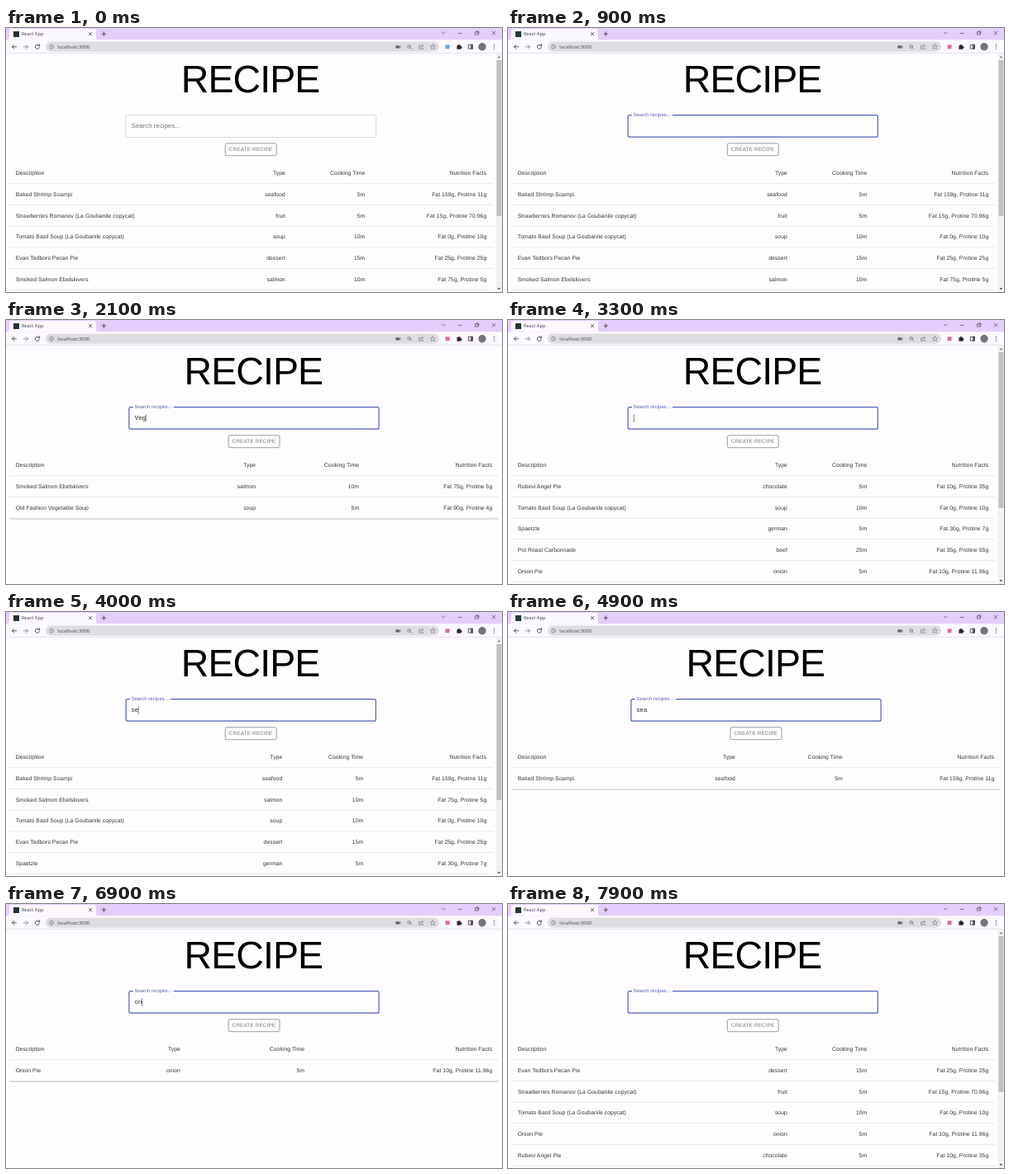
An HTML page for the animation above (8 s loop, 600 px wide and 320 px high).

```html
<!DOCTYPE html>
<html lang="en">
<head>
<meta charset="utf-8">
<title>Recipe search</title>
<style>
html, body { margin: 0; width: 100%; height: 100%; overflow: hidden; background: #fefcff; }
svg { display: block; width: 600px; height: 320px; }
text { font-family: "Liberation Sans", Arial, sans-serif; text-rendering: geometricPrecision; white-space: pre; }
.ui { font-family: "Open Sans", sans-serif; fill: #45414a; }
.cell { font-size: 6.78px; letter-spacing: .0107em; fill: #333; }
.field { font-size: 7.75px; letter-spacing: .0094em; }
.icon { fill: none; stroke: #4a474e; stroke-width: .9; stroke-linecap: round; stroke-linejoin: round; }
.thin { stroke-width: .65; }
.soft { stroke: #737077; }
.solid { fill: #5d5a61; }
</style>
</head>
<body>
<svg viewBox="0 0 600 320">
  <defs>
    <filter id="shadow" x="-5%" y="-10%" width="110%" height="125%">
      <feDropShadow dx="0" dy=".7" stdDeviation=".7" flood-opacity=".34"/>
    </filter>
    <clipPath id="view"><rect y="31" width="600" height="289"/></clipPath>
  </defs>
  <rect width="600" height="320" fill="#fefcff"/>

  <g clip-path="url(#view)">
    <g id="center">
      <text x="-84.4" y="77.9" font-size="46.5" letter-spacing="-.92">RECIPE</text>
      <path id="outline" fill="none"/>
      <text id="label" class="field">Search recipes...</text>
      <text id="query" class="field" x="-144.4" y="121.4" fill="#333"></text>
      <rect id="caret" y="114.5" width=".6" height="9" fill="#222"/>
      <rect x="-31" y="139.8" width="62" height="14.9" rx="2" fill="none" stroke="#858585" stroke-width=".8"/>
      <text x="-26.4" y="149.3" font-size="6.3" letter-spacing=".18" fill="#777">CREATE RECIPE</text>
    </g>
    <rect id="paper" x="4" y="163.3" rx="2" fill="#fefcff" filter="url(#shadow)"/>
    <g id="table"></g>
  </g>

  <g id="scrollbar">
    <rect x="592.5" y="31" width="7.5" height="289" fill="#f2f0f3"/>
    <rect x="593.5" y="39" width="5.8" height="189" fill="#c1bfc3"/>
    <path d="M594.5 36.2l1.9-2.2 1.9 2.2z" fill="#777"/>
    <path d="M594.5 315l1.9 2.2 1.9-2.2z" fill="#555"/>
  </g>

  <rect width="600" height="14.5" fill="#e4cefb"/>
  <path d="M1 14.5q3 0 3-3V4q0-3 3-3h99q3 0 3 3v7.5q0 3 3 3z" fill="#fcf8ff"/>
  <rect x="9" y="4" width="7" height="7" fill="#24333c"/>
  <text class="ui" x="18.8" y="9" font-size="5.7">React App</text>
  <g class="icon">
    <path d="M100.4 5.6l3.200 3.200m0-3.200l-3.200 3.200M115.800 7.100h5m-2.500-2.500v5"/>
    <path class="thin" d="M527.300 5.100l2 2 2-2M547.300 6.400h4.200M567.800 4.900h3.200v3.200h-3.200zM568.800 4.900v-1h3.200v3.200h-1M588 4.200l4 4m0-4l-4 4"/>
  </g>

  <rect y="14.5" width="600" height="16" fill="#fcf8ff"/>
  <rect y="30.3" width="600" height=".6" fill="#d8d5db"/>
  <rect x="48" y="16.6" width="476" height="12.2" rx="6.1" fill="#dfdde1"/>
  <text class="ui" x="62.3" y="24.6" font-size="5.75">localhost:3000</text>
  <g class="icon">
    <path d="M12.6 22.8h-5.2m2.4-2.4l-2.4 2.4 2.4 2.4"/>
    <path d="M21.4 22.8h5.2m-2.4-2.4l2.4 2.4-2.4 2.4" stroke="#8b8890"/>
    <path d="M40.3 21.5a2.6 2.6 0 1 0 .2 2M40.6 19.8v1.9h-1.9"/>
    <g class="thin soft">
      <circle cx="55" cy="22.8" r="2.5"/>
      <path d="M55 22.6v1.5M55 21.3v.1"/>
      <path class="solid" d="M472 21.4h3.200v2.900h-3.200zM475.4 22.8l1.500-1.200v2.500z"/>
      <circle cx="487.7" cy="22.4" r="2"/>
      <path d="M489.2 23.9l1.800 1.800M486.8 22.400h1.800"/>
      <path d="M501 21.3h-1.400v4h5v-1.200M501.3 23.600q.2-2.300 3-2.300m-1.200-1.300l1.400 1.300-1.400 1.300"/>
      <path d="M516.5 19.700l.9 2 2.100.2-1.600 1.500.5 2.100-1.900-1.100-1.900 1.100.5-2.100-1.600-1.500 2.100-.2z"/>
    </g>
    <path d="M545.8 21.3h1.400q-.2-1.300.8-1.300t.8 1.300h1.400v1.400q1.300-.2 1.300.8t-1.300.8v1.300h-4.400z" style="fill:#28252c;stroke:#28252c;stroke-width:.4"/>
    <path d="M559.7 20.300h4.800v4.800h-4.800z"/>
    <path class="solid" d="M562.8 20.300h1.700v4.800h-1.700z"/>
  </g>
  <rect id="extension" x="531.6" y="20.3" width="5" height="5"/>
  <circle cx="576" cy="22.8" r="4.7" fill="#77737b"/>
  <g fill="#4a474e"><circle cx="590.5" cy="20.5" r=".65"/><circle cx="590.5" cy="22.8" r=".65"/><circle cx="590.5" cy="25.1" r=".65"/></g>
</svg>
<script>
const LOOP = 8000, FOCUS = 300, PAD = 7.75, TOP = 163.3, ROW = 25.7;
const HEAD = ["Description", "Type", "Cooking Time", "Nutrition Facts"];
const RECIPES = [
  ["Baked Shrimp Scampi", "seafood", 5, 159, 11],
  ["Strawberries Romanov (La Goubanile copycat)", "fruit", 5, 15, 70.96],
  ["Tomato Basil Soup (La Goubanile copycat)", "soup", 10, 0, 10],
  ["Evan Tedbors Pecan Pie", "dessert", 15, 25, 25],
  ["Smoked Salmon Ebelskivers", "salmon", 10, 75, 5],
  ["Rubevi Angel Pie", "chocolate", 5, 10, 35],
  ["Spaetzle", "german", 5, 30, 7],
  ["Pot Roast Carbonnade", "beef", 25, 35, 55],
  ["Onion Pie", "onion", 5, 10, 11.96],
  ["Old Fashion Vegetable Soup", "soup", 5, 90, 4]
].map(([name, type, mins, fat, protein]) =>
  [name, type, mins + "m", `Fat ${fat}g, Protine ${protein}g`]);

// [time, text in the field]
const TYPING = [
  [FOCUS, ""], [1500, "V"], [1800, "Ve"], [2000, "Veg"],
  [2500, "Ve"], [2650, "V"], [2850, ""],
  [3600, "s"], [3950, "se"], [4200, "sea"],
  [5250, "se"], [5400, "s"], [5550, ""],
  [5950, "o"], [6100, "on"], [6250, "oni"],
  [6880, "on"], [6980, "o"], [7100, ""]
];
// [time, recipe indices]; answers trail the typing
const RESULTS = [
  [0, "0123456789"], [1690, "4915"], [1980, "49"], [2250, "9"],
  [2690, "49"], [2850, "4915"], [3050, "5267801349"],
  [3790, "04236179"], [4090, "03"], [4390, "0"],
  [5450, "03"], [5600, "04236179"], [5750, "5267801349"],
  [6150, "0459127843"], [6380, "478"], [6480, "8"],
  [7050, "478"], [7170, "0459127843"], [7290, "3128504679"]
];

const $ = id => document.getElementById(id);
const set = (el, attrs) => { for (const k in attrs) el.setAttribute(k, attrs[k]); };
const add = (tag, attrs) => {
  const el = document.createElementNS("http://www.w3.org/2000/svg", tag);
  set(el, attrs);
  return $("table").appendChild(el);
};
const latest = (list, t) => list.findLast(item => item[0] <= t);

const lines = Array.from({ length: 11 }, (_, i) => ({
  rule: add("rect", { x: 4, y: TOP + ROW * (i + 1) - .5, height: .6, fill: "#dddbdf" }),
  cells: HEAD.map((_, c) => add("text", {
    class: "cell", y: TOP + ROW * i + 14.8, "text-anchor": c ? "end" : "start"
  }))
}));

// Spare width is shared in proportion to each column's widest text.
let shown = null;
function drawTable(ids) {
  if (ids === shown) return;
  shown = ids;
  const rows = [HEAD, ...[...ids].map(i => RECIPES[i])];
  const scrolls = ids.length > 4, width = scrolls ? 585 : 592;
  lines.forEach((line, i) => {
    line.cells.forEach((cell, c) => { cell.textContent = rows[i] ? rows[i][c] : ""; });
    set(line.rule, { width: i < rows.length ? width : 0 });
  });
  const need = HEAD.map((_, c) =>
    2 * PAD + Math.max(...rows.map((_, i) => lines[i].cells[c].getComputedTextLength())));
  const ratio = width / need.reduce((a, b) => a + b);
  let right = 4;
  need.forEach((w, c) => {
    const left = right;
    right += w * ratio;
    lines.forEach(line => set(line.cells[c], { x: c ? right - PAD : left + PAD }));
  });
  set($("paper"), { width, height: ROW * rows.length });
  set($("center"), { transform: `translate(${scrolls ? 296.25 : 300} 0)` });
  $("scrollbar").style.display = scrolls ? "" : "none";
}

function drawField(t) {
  const focused = t >= FOCUS;
  const p = Math.min(1, Math.max(0, (t - FOCUS) / 200));
  const ease = 1 - (1 - p) ** 3;
  const stroke = focused ? 1.2 : .6, inset = stroke / 2;
  const l = -151.7 + inset, r = 151.7 - inset, top = 105 + inset, bottom = 132.8 - inset;
  const gap = 49 * ease;
  set($("outline"), {
    d: `M${-146.3 + gap} ${top}H${r - 2}q2 0 2 2V${bottom - 2}q0 2-2 2H${l + 2}q-2 0-2-2V${top + 2}q0-2 2-2H-146.3`,
    stroke: focused ? "#5260b8" : "#c6c4c8", "stroke-width": stroke
  });
  set($("label"), {
    transform: `translate(-144.6 ${121.4 - 14 * ease}) scale(${1 - .24 * ease})`,
    fill: focused ? "#5260b8" : "#777"
  });
  const [since, text] = latest(TYPING, t) || [0, ""];
  const query = $("query");
  query.textContent = text;
  const end = text ? query.getComputedTextLength() - .4 : 0;
  set($("caret"), { x: -144.4 + end, opacity: focused && (t - since) % 1000 < 500 ? 1 : 0 });
  set($("extension"), { fill: focused ? "#dd7188" : "#68a5da" });
}

function draw(now) {
  const t = now % LOOP;
  drawTable(latest(RESULTS, t)[1]);
  drawField(t);
}

let start;
function tick(now) {
  start ??= now;
  draw(now - start);
  requestAnimationFrame(tick);
}
draw(0);
requestAnimationFrame(tick);
</script>
</body>
</html>
```
